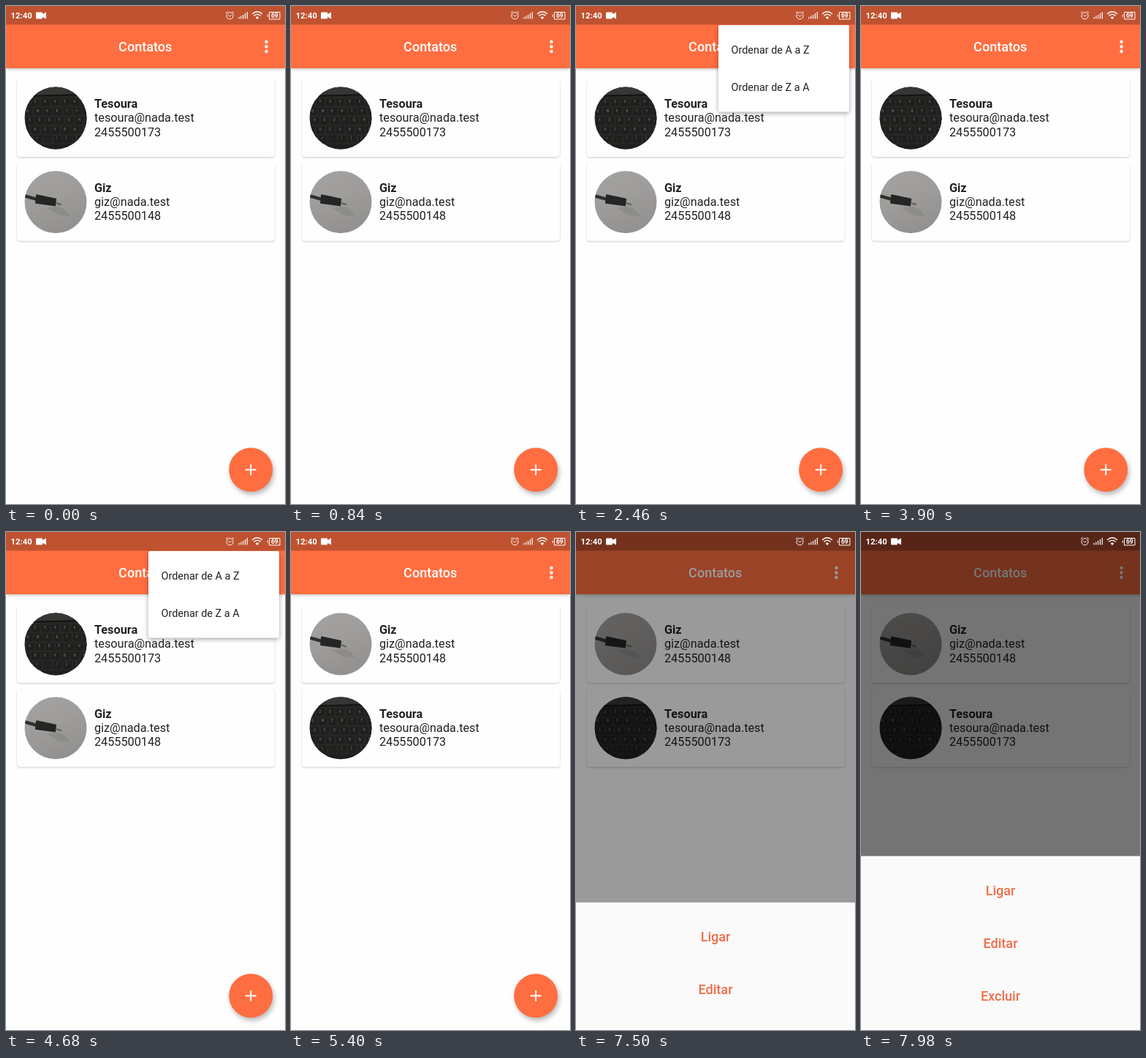
Recreate the animation shown at these times as an HTML page. Size 382 by 680 pixels, loop 8 s.

```html
<!DOCTYPE html>
<html lang="pt">
<head>
<meta charset="utf-8">
<title>Contatos</title>
<style>
html, body { margin: 0; width: 100%; height: 100%; overflow: hidden; background: #fefefe; }
svg { display: block; width: 100vw; height: 100vh; font-family: Roboto, sans-serif; }
.card { fill: #fefefe; filter: drop-shadow(0 1px .8px #0003); }
.bar { fill: #ff6e40; filter: drop-shadow(0 1px 2px #0004); }
.info { font-size: 16.24px; fill: #212121; }
.name { font-weight: 700; }
.title { font-size: 18.04px; font-weight: 500; text-anchor: middle; }
.item { font-size: 14.43px; fill: #212121; }
.line { fill: none; stroke: #fff; }
#panel { fill: #fff; filter: drop-shadow(0 2px 3px #0005); }
#fab { filter: drop-shadow(2px 4px 3px #0004); }
</style>
</head>
<body>
<svg viewBox="0 0 382 680" preserveAspectRatio="none">
  <defs>
    <clipPath id="round"><circle r="42.5"/></clipPath>
    <linearGradient id="cloth" x2=".4" y2="1">
      <stop stop-color="#a5a3a1"/><stop offset=".5" stop-color="#9f9d9b"/><stop offset="1" stop-color="#949290"/>
    </linearGradient>
  </defs>
  <rect width="382" height="680" fill="#fefefe"/>

  <g id="scissors">
    <rect class="card" x="15" y="99.5" width="353" height="106.500" rx="4"/>
    <g transform="translate(68 153)" clip-path="url(#round)">
      <rect x="-43" y="-43" width="86" height="86" fill="#262624"/>
      <path d="M-43-43H43V-33L-43-31Z" fill="#373634"/>
      <path d="M-43-30 43-32" stroke="#141413" stroke-width="2"/>
      <g id="keys"></g>
    </g>
    <g class="info">
      <text class="name" x="121" y="139">Tesoura</text>
      <text x="121" y="158">tesoura@nada.test</text>
      <text x="121" y="177.500">2455500173</text>
    </g>
  </g>

  <g id="chalk">
    <rect class="card" x="15" y="99.5" width="353" height="106.500" rx="4"/>
    <g transform="translate(68 153)" clip-path="url(#round)">
      <rect x="-43" y="-43" width="86" height="86" fill="url(#cloth)"/>
      <path d="M-12 8 2 6 12 9 20 19 4 18Z" fill="#7c7a78" opacity=".4"/>
      <path d="M-44-9-26-4" stroke="#30302e" stroke-width="4.500"/>
      <path d="M-26-9.500 0-4-1 4.500-27 1Z" fill="#252524" stroke="#252524" stroke-width="2" stroke-linejoin="round"/>
      <path d="M1 1.500 8 3.500" stroke="#6a6865" stroke-width="2.500"/>
    </g>
    <g class="info">
      <text class="name" x="121" y="139">Giz</text>
      <text x="121" y="158">giz@nada.test</text>
      <text x="121" y="177.500">2455500148</text>
    </g>
  </g>

  <rect class="bar" width="382" height="85"/>
  <text class="title" x="190.700" y="62" fill="#fff">Contatos</text>
  <g fill="#fff">
    <circle cx="356.5" cy="49" r="2.2"/><circle cx="356.5" cy="55.5" r="2.2"/><circle cx="356.5" cy="62" r="2.2"/>
  </g>
  <g id="fab">
    <circle cx="335.2" cy="633.3" r="30" fill="#ff6e40"/>
    <path class="line" d="M327.8 633.3h14.8M335.2 625.9v14.8" stroke-width="2"/>
  </g>

  <g id="menu">
    <rect id="panel" y="26" rx="2"/>
    <text class="item" x="212.500" y="65">Ordenar de A a Z</text>
    <text class="item" x="212.500" y="116">Ordenar de Z a A</text>
  </g>

  <rect width="382" height="25.5" fill="#bf5230"/>
  <rect id="scrim" width="382" height="680"/>
  <g id="sheet" class="title" fill="#f06d48">
    <rect y="442.5" width="382" height="238" fill="#fafafa"/>
    <text x="191" y="495.5">Ligar</text>
    <text x="191" y="567.7">Editar</text>
    <text x="191" y="640">Excluir</text>
  </g>

  <g fill="#fff">
    <text x="6.5" y="17" font-size="11.3" font-weight="700">12:40</text>
    <path d="M42 8.5h7q1 0 1 1V11l5-2.5v9L50 15v1.5q0 1-1 1h-7q-1 0-1-1v-7q0-1 1-1Z"/>
    <path d="M318.5 15h1.2v2.5h-1.2zM321.3 13.500h1.2v4h-1.2zM324.1 12h1.2v5.500h-1.2zM326.9 10h1.2v7.500h-1.2zM329.7 8h1.2v9.500h-1.2z"/>
    <g class="line" stroke-width="1">
      <circle cx="306.5" cy="13.3" r="4.6"/>
      <path d="M304.3 12.3l2.200 1.800 2.200-1.800M301 9.500l2.500-2M312 9.500l-2.500-2"/>
    </g>
    <path class="line" d="M337 11q7-6.500 14 0M339.300 13.500q4.700-4.200 9.400 0" stroke-width="1.200"/>
    <path d="M341.700 15.500q2.300-1.800 4.600 0l-2.300 2.700Z"/>
    <path class="line" d="M360.500 8.500h14.500v9.500h-14.500zM358.300 11.500v3.500" stroke-width="1"/>
    <text x="367.800" y="16.300" font-size="8.500" font-weight="700" text-anchor="middle">69</text>
  </g>
</svg>
<script>
const LOOP = 8000, MENU_TIME = 300, SHEET_TIME = 250;
const MENU_VISITS = [[2040, 2880], [4140, 4860]];
const SORT_AT = 4860, SHEET_AT = 7380;
const ROW_STEP = 114.8, SHEET_HEIGHT = 238;
const $ = id => document.getElementById(id);
const clamp = v => Math.min(1, Math.max(0, v));
const interval = (v, from, to) => clamp((v - from) / (to - from));
const items = document.querySelectorAll('.item');

function buildKeys() {
  const legends = ['1234567', 'QWERTYU', 'ASDFGHJ', 'ZXCVBNM', '<>;/[]~'];
  let markup = '';
  legends.forEach((row, r) => [...row].forEach((letter, c) => {
    const x = -47 + c * 13.5 + r % 3 * 3, y = -27 + r * 12.6;
    markup += `<rect x="${x}" y="${y}" width="12" height="11" rx="1.5" fill="#1f1f1e" stroke="#2e2d2b" stroke-width=".6"/>
      <text x="${x + 4}" y="${y + 6}" font-size="4.5" fill="#83817d">${letter.replace('<', '&lt;')}</text>`;
  }));
  markup += '<rect x="-20" y="36" width="50" height="10" rx="1.5" fill="#1f1f1e"/>';
  $('keys').innerHTML = markup;
}

function menuProgress(t) {
  for (const [open, close] of MENU_VISITS) {
    if (t >= open && t < close) return clamp((t - open) / MENU_TIME);
    if (t >= close && t < close + MENU_TIME) return clamp((1 - (t - close) / MENU_TIME) * 1.5);
  }
  return 0;
}

function drawMenu(p) {
  const unit = 1 / 3.5;
  const width = 179 * interval(p, 0, unit), height = 118.5 * interval(p, 0, 2 * unit);
  $('menu').setAttribute('opacity', interval(p, 0, 1 / 3));
  $('panel').setAttribute('x', 374 - width);
  $('panel').setAttribute('width', width);
  $('panel').setAttribute('height', height);
  items.forEach((item, i) => item.setAttribute('opacity', interval(p, (i + 1) * unit, (i + 2.5) * unit)));
}

function draw(now) {
  const t = now % LOOP;
  const sorted = t >= SORT_AT;
  $('scissors').setAttribute('transform', `translate(0 ${sorted ? ROW_STEP : 0})`);
  $('chalk').setAttribute('transform', `translate(0 ${sorted ? 0 : ROW_STEP})`);
  drawMenu(menuProgress(t));
  const rise = 1 - (1 - clamp((t - SHEET_AT) / SHEET_TIME)) ** 2;
  $('scrim').setAttribute('opacity', .54 * rise);
  $('sheet').setAttribute('transform', `translate(0 ${SHEET_HEIGHT * (1 - rise)})`);
}

buildKeys();
const start = performance.now();
function tick() {
  draw(performance.now() - start);
  requestAnimationFrame(tick);
}
tick();
</script>
</body>
</html>
```
